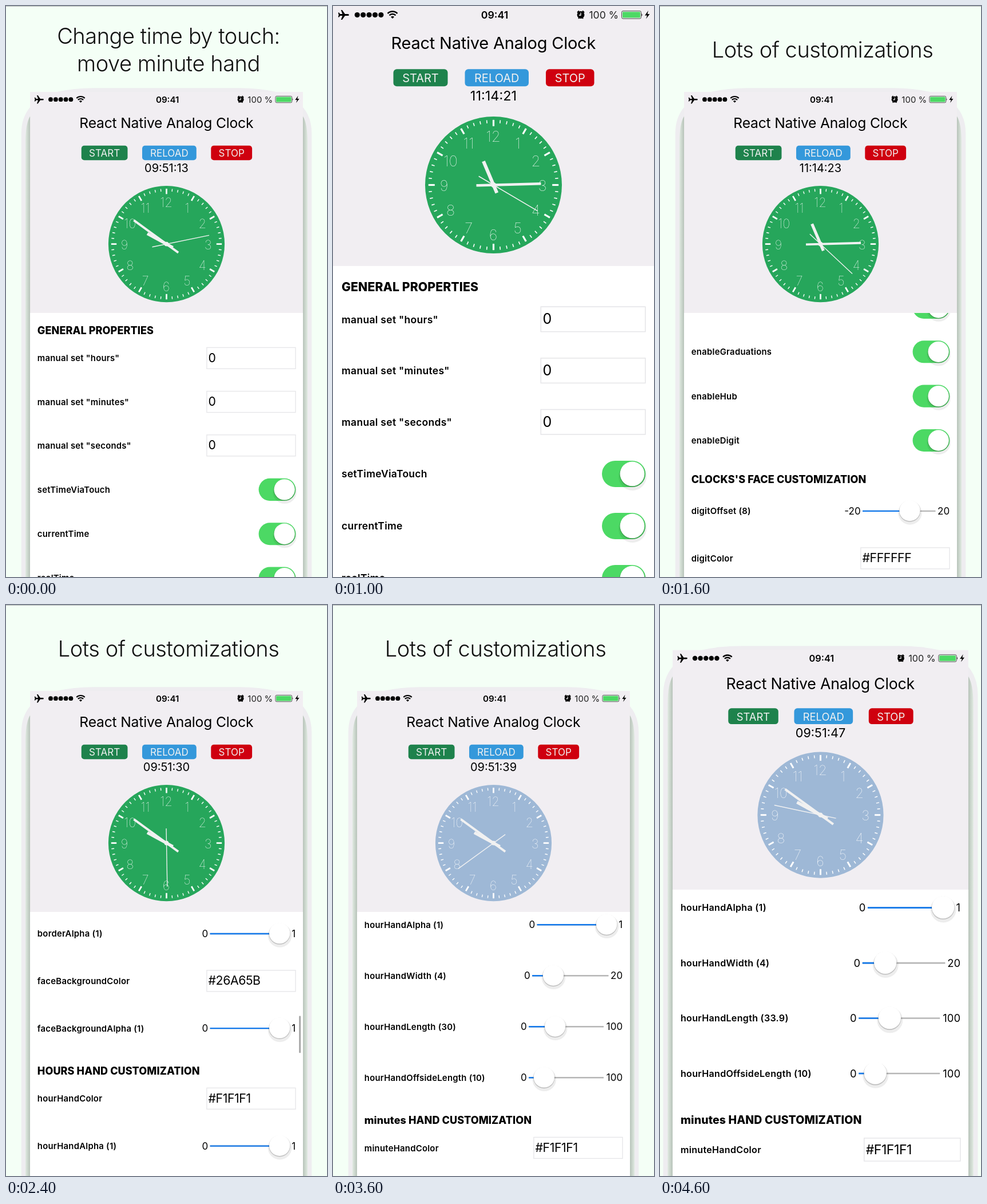
An HTML page that plays this animation: 561x997 px, repeating every 4800 ms.

```html
<!DOCTYPE html>
<html lang="en">
<head>
<meta charset="utf-8">
<title>Analog clock demo</title>
<style>
  html, body { margin: 0; height: 100%; overflow: hidden; background: #f4fff6; }
  svg { display: block; }
  #stage { width: 100vw; height: 100vh; }
  text { font-family: Inter, Roboto, sans-serif; font-optical-sizing: none; white-space: pre; }
</style>
</head>
<body>
<svg id="stage" viewBox="0 0 561 997" preserveAspectRatio="none"></svg>
<script>
const STEP = 200, FRAMES = 24;
const LIST_TOP = 454, LIST_HEIGHT = 544, LIST_PADDING = 1, CONTENT_HEIGHT = 3868;

// Keys are [frame, value] pairs, joined linearly.
const SECONDS = [[0, 13], [5, 21], [8, 23], [12, 30], [15, 36], [18, 39], [23, 47]];
const MINUTES = [[0, 591], [1, 591], [4, 674.75], [9, 674.75], [10, 591]];
// The hour and second hands glide a little apart from the digital time.
const HOUR_ANGLE = [[0, 298.5], [1, 298.5], [4, 337], [9, 337], [10, 298.5]];
const SECOND_ANGLE = [[0, 78.5], [5, 120.5], [8, 133], [12, 179], [15, 209], [18, 234], [23, 282]];
const SCROLL = [[0, 0], [6, 0], [8, 556], [9, 701], [12, 1516.5], [13, 1543.5],
  [15, 1543.5], [18, 1971], [19, 1971], [20, 1963]];
const HOUR_LENGTH = [[0, 30], [19, 30], [21, 33.9]];
const BAR_FRAMES = [7, 10, 11, 12, 16, 17, 20];

const at = (keys, n) => {
  const i = keys.findIndex(k => k[0] > n);
  if (i < 0) return keys[keys.length - 1][1];
  const [a, u] = keys[i - 1], [b, v] = keys[i];
  return u + (v - u) * (n - a) / (b - a);
};
const two = v => String(Math.floor(v)).padStart(2, '0');

// y is the middle of the capitals.
const text = (x, y, str, size, more = '') =>
  `<text x="${x}" y="${y + size * 0.364}" font-size="${size}" ${more}>${str}</text>`;
const mid = (x, y, str, size, more = '') => text(x, y, str, size, 'text-anchor="middle" ' + more);
const rect = (x, y, w, h, fill, more = '') =>
  `<rect x="${x}" y="${y}" width="${w}" height="${h}" fill="${fill}" ${more}/>`;
const circle = (x, y, r, fill, more = '') => `<circle cx="${x}" cy="${y}" r="${r}" fill="${fill}" ${more}/>`;
const path = (d, more) => `<path d="${d}" ${more}/>`;
const line = (d, color, width, more = '') =>
  path(d, `fill="none" stroke="${color}" stroke-width="${width}" ${more}`);

function title(n) {
  const row = (y, str) => mid(284, y, str, 38, 'font-weight="300" letter-spacing="-.45" fill="#111"');
  if (n < 5) return row(52, 'Change time by touch:') + row(100, 'move minute hand');
  return n > 5 && n < 23 ? row(76, 'Lots of customizations') : '';
}

const body = `
  <linearGradient id="edge">
    <stop offset="0" stop-color="#e0eae1"/><stop offset=".018" stop-color="#b3bfb5"/>
    <stop offset=".982" stop-color="#b3bfb5"/><stop offset="1" stop-color="#e0eae1"/>
  </linearGradient>
  ${path('M-18 1010V85Q-18 20 55 0Q90-8 130-8H431Q471-8 506 0Q579 20 579 85V1010Z', 'fill="#eeedf0"')}
  ${path('M-9.5 1010V100Q-9 65 0 50H561Q570 65 570.5 100V1010Z', 'fill="url(#edge)"')}
  ${rect(0, 0, 561, 998, '#f1eef2')}`;

const statusBar =
  path('M28 15.5q0-1.5-2-1.5h-5l-5-7h-2l2.5 7h-4l-2-2.5h-1.5l1 4-1 4h1.5l2-2.5h4l-2.5 7h2l5-7h5q2 0 2-1.5z', '') +
  [0, 1, 2, 3, 4].map(i => circle(42.3 + i * 10.4, 15.5, 4.6, '#000')).join('') +
  line('M95.5 13a12 12 0 0 1 17 0M98.5 16.3a8 8 0 0 1 11 0', '#000', 2.5) +
  path('M101 19l3 3 3-3q-3-2.5-6 0z', '') +
  mid(282.5, 15.5, '09:41', 17.8, 'font-weight="600"') +
  circle(433, 15.5, 6.4, '#000') +
  line('M427 11.5l3-3M439 11.5l-3-3M429 22l1.5-2M437 22l-1.5-2', '#000', 2) +
  line('M433 11.5v4.5h-3.2', '#fff', 1.3) +
  text(499, 15.5, '100 %', 17.6, 'text-anchor="end" fill="#222"') +
  rect(504.5, 8.7, 34, 13.4, 'none', 'rx="2.5" stroke="#444"') +
  rect(506, 10.2, 31, 10.4, '#4cd964', 'rx="1"') +
  path('M539.5 13q2 2.4 0 5z', '') +
  path('M551 8l-6 8.5h4l-2 6 6.5-8.5h-4z', '');

const button = (x, w, fill, label) => rect(x, 110.3, w, 30, fill, 'rx="6"') +
  mid(x + w / 2, 126, label, 20, 'fill="#f1f1f1"');
const toolbar =
  mid(280.3, 64, 'React Native Analog Clock', 29, 'letter-spacing="-.22"') +
  button(105.5, 95, '#1e824c', 'START') +
  button(230.5, 111.5, '#3498db', 'RELOAD') +
  button(372, 84.5, '#cf000f', 'STOP');

function clock(n) {
  const minutes = at(MINUTES, n), seconds = at(SECONDS, n);
  const hand = (angle, length, back, width) =>
    line(`M0 ${back}V${-length}`, '#f1f1f1', width, `transform="rotate(${angle})"`);
  let face = circle(0, 0, 119.5, n < 15 ? '#26a65b' : '#26a6');
  for (let i = 0; i < 60; i++) {
    const major = i % 5 === 0;
    face += line(`M0-113.7v${major ? 11 : 5.5}`, '#fff', major ? 3.2 : 1.6, `transform="rotate(${i * 6})"`);
  }
  for (let i = 1; i <= 12; i++) {
    const a = i * Math.PI / 6;
    face += mid(86 * Math.sin(a) - 0.5, 1 - 86 * Math.cos(a), i, 26, 'font-weight="100" fill="#fff"');
  }
  const time = [minutes / 60, minutes % 60, seconds].map(two).join(':');
  return mid(280.5, 156.5, time, 23.5) + `<g transform="translate(280.5 312.5)">${face}` +
    hand(at(HOUR_ANGLE, n), at(HOUR_LENGTH, n) * 1.496, 15, 6) +
    hand(minutes % 60 * 6, 83, 30, 4.5) +
    hand(at(SECOND_ANGLE, n), 89.5, 30, 1.6) +
    circle(0, 0, 4.5, '#f1f1f1') + '</g>';
}

// [heading], [label, text], [label, true] or [label, value, max, min]
const rows = n => [
  ['GENERAL PROPERTIES'],
  ['manual set "hours"', '0'], ['manual set "minutes"', '0'], ['manual set "seconds"', '0'],
  ['setTimeViaTouch', true], ['currentTime', true], ['realTime', true],
  ['enableGraduations', true], ['enableHub', true], ['enableDigit', true],
  ["CLOCKS'S FACE CUSTOMIZATION"],
  ['digitOffset', 8, 20, -20], ['digitColor', '#FFFFFF'], ['digitAlpha', 1, 1],
  ['digitSize', 18, 100], ['borderColor', '#FFFFFF'], ['borderWidth', 0, 20], ['borderAlpha', 1, 1],
  ['faceBackgroundColor', hexText(n)], ['faceBackgroundAlpha', 1, 1],
  ['HOURS HAND CUSTOMIZATION'],
  ['hourHandColor', '#F1F1F1'], ['hourHandAlpha', 1, 1], ['hourHandWidth', 4, 20],
  ['hourHandLength', +at(HOUR_LENGTH, n).toFixed(1), 100], ['hourHandOffsideLength', 10, 100],
  ['minutes HAND CUSTOMIZATION'],
  ['minuteHandColor', '#F1F1F1'], ['minuteHandAlpha', 1, 1]
];
const hexText = n => n < 14 ? '#26A65B' : n < 15 ? '#26A65' : '#26A6';
const typing = n => n >= 13 && n <= 15;

const thumb = (x, y) => circle(x + 0.5, y + 4.5, 24.5, '#000', 'opacity=".07"') +
  circle(x, y + 1.2, 22, '#000', 'opacity=".2"') + circle(x, y, 21.4, '#fff');

const input = (y, value) =>
  rect(363.3, y - 22, 182.5, 43.5, '#fff', 'stroke="#e6e6e9" stroke-width="1.6"') +
  text(366.5, y - 1, value, 25, 'letter-spacing="-.5"');

const toggle = y => rect(470, y - 23, 76.3, 46, '#4cd964', 'rx="23"') + thumb(523, y);

const TRACKS = { 1: [370, 533], 20: [360, 517], 100: [353, 507] };
function slider(y, value, max, min = 0) {
  let [start, end] = TRACKS[max];
  if (min) start += 7;
  const x = start + 20 + (value - min) / (max - min) * (end - start - 40);
  return line(`M${start} ${y}H${end}`, '#b6b6b6', 2.8) + line(`M${start} ${y}H${x}`, '#1279ec', 2.8) +
    text(start - 4, y, min, 20, 'text-anchor="end"') + text(546, y, max, 20, 'text-anchor="end"') +
    thumb(x, y - 1);
}

function list(n) {
  const scroll = at(SCROLL, n);
  let top = LIST_PADDING - scroll, out = '';
  for (const [label, value, max, min] of rows(n)) {
    const heading = value === undefined, sliding = typeof value === 'number';
    const height = heading ? 47.3 : sliding ? 104.7 : value === true ? 91 : 89.7;
    const y = top + (heading ? 35 : height / 2);
    if (top > -height - 20 && top < LIST_HEIGHT) {
      out += heading ? text(15, y, label, 21.2, 'font-weight="800" letter-spacing=".1"')
        : text(15, y, sliding ? `${label} (${value})` : label, 17.5, 'font-weight="600" letter-spacing=".3"') +
          (sliding ? slider(y, value, max, min) : value === true ? toggle(y) : input(y, value));
      if (label === 'faceBackgroundColor' && typing(n))
        out += rect(443.5 + 15.5 * (value.length - 5), y - 17, 2.6, 32, '#3d7fd6');
    }
    top += height;
  }
  if (BAR_FRAMES.includes(n))
    out += rect(553, scroll * LIST_HEIGHT / CONTENT_HEIGHT, 3.6, 76.5, '#a9a9a9', 'rx="1.8"');
  return rect(0, LIST_TOP, 561, LIST_HEIGHT, '#fff') +
    `<svg y="${LIST_TOP}" width="561" height="${LIST_HEIGHT}" overflow="hidden">${out}</svg>`;
}

function keyboard(n) {
  const rowTop = i => 690 + i * 79.6;
  const key = (x, row, w, fill = '#fff') => rect(x, rowTop(row) + 1.8, w, 62, '#8b8e94', 'rx="6.5"') +
    rect(x, rowTop(row), w, 62, fill, 'rx="6.5"');
  const letters = (chars, x, row) => [...chars].map((c, i) => key(x + i * 56.1, row, 48) +
    mid(x + 24 + i * 56.1, rowTop(row) + 28, c, 35)).join('');
  const word = (x, w, label, fill) => key(x, 3, w, fill) + mid(x + w / 2, rowTop(3) + 31, label, 22.8);
  const grey = '#acb3be';
  const icon = (d, color = '#111') => line(d, color, 2, 'stroke-linejoin="round" stroke-linecap="round"');
  return rect(0, 610.5, 561, 63, '#bdc2ca') + rect(0, 673, 561, 325, '#d2d5db') +
    rect(185.5, 610.5, 1.5, 63, '#d9dce1') + rect(374, 610.5, 1.5, 63, '#d9dce1') +
    mid(93, 640.5, `«${hexText(n).slice(1)}»`, 25, 'fill="#fff"') +
    letters('azertyuiop', 4.7, 0) + letters('qsdfghjklm', 4.7, 1) + letters('wxcvbn´', 87, 2) +
    key(4.7, 2, 62.5, grey) + icon('M36 867l-14 14h7.5v11h13v-11h7.5z') +
    key(494, 2, 62.5, grey) + icon('M508 880l10-11h23v22h-23zM523 875l10 10M533 875l-10 10') +
    word(4.7, 61, '123', grey) +
    key(74, 3, 61, grey) + circle(104.5, 959, 14, 'none', 'stroke="#111" stroke-width="1.8"') +
    icon('M90.5 959h28M104.5 945v28M93 951.5h23M93 966.5h23M104.5 945q-14 14 0 28q14-14 0-28') +
    key(144.5, 3, 48) + rect(164.5, 944, 8, 19, '#aaa', 'rx="4"') +
    icon('M160.5 956v3q0 9 8 9t8-9v-3M168.5 968v6M163.5 974h10', '#aaa') +
    word(201, 216.5, 'espace', '#fff') + word(426, 131, 'retour', grey);
}

function scene(n) {
  const zoom = n === 5 ? 0 : n === 23 ? 0.525 : 1;
  const scale = 1 - 0.15 * zoom;
  return rect(0, 0, 561, 997, '#f4fff6') + rect(0, 0, 561, 1, '#b4b9b5') + title(n) +
    `<g transform="translate(${280.5 * (1 - scale)} ${150 * zoom}) scale(${scale})">` +
    body + statusBar + toolbar + clock(n) + list(n) + (typing(n) ? keyboard(n) : '') + '</g>';
}

const stage = document.getElementById('stage');
const begin = performance.now();
let shown = -1;
function tick() {
  const n = Math.floor((performance.now() - begin) / STEP) % FRAMES;
  if (n !== shown) stage.innerHTML = scene(shown = n);
  requestAnimationFrame(tick);
}
tick();
</script>
</body>
</html>
```
